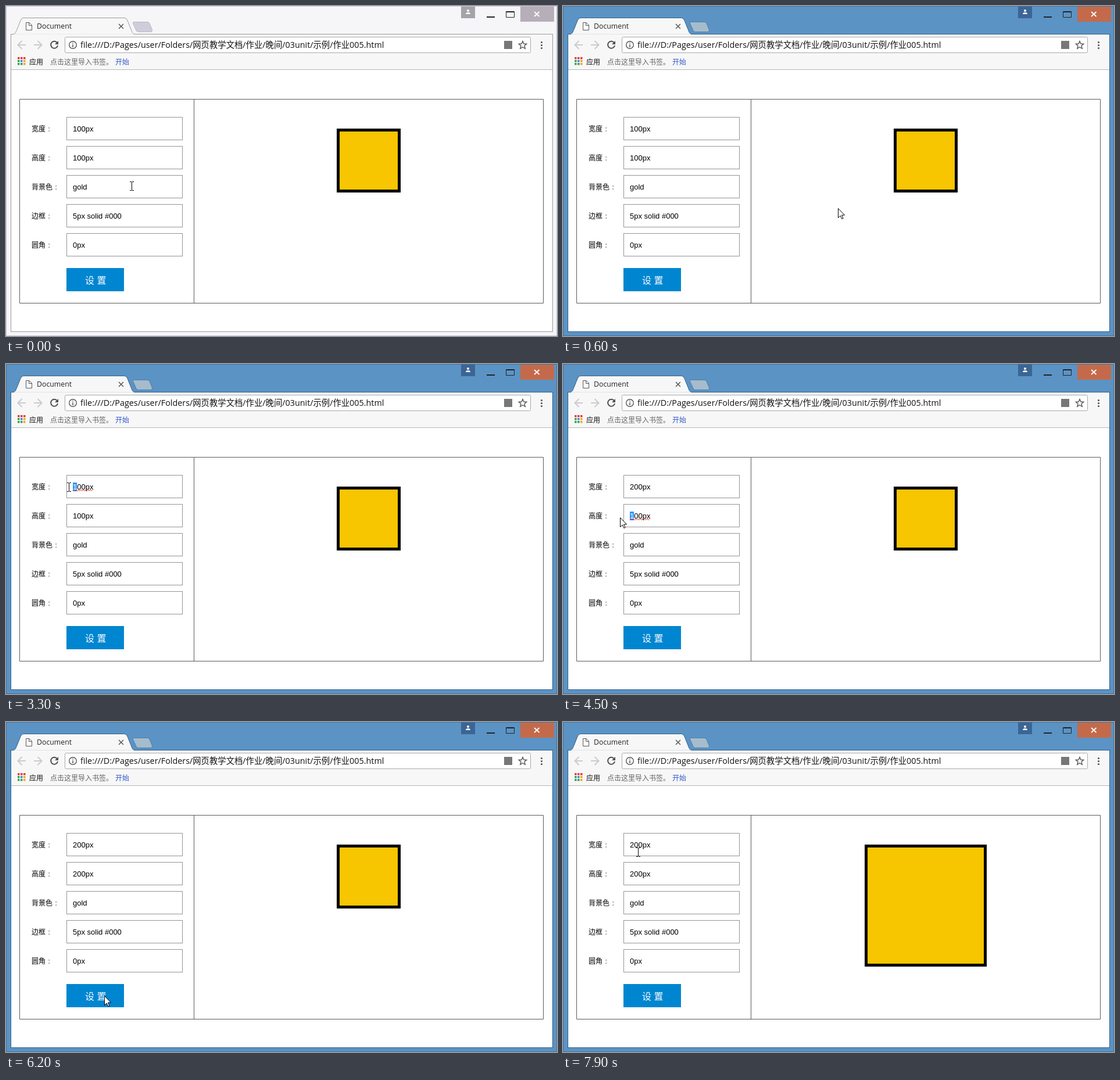
An HTML page that plays this animation: 948 by 568 pixels, repeating every 8000 ms.

```html
<!DOCTYPE html>
<html lang="zh-CN">
<head>
<meta charset="utf-8">
<title>Document</title>
<style>
  html, body { margin: 0; width: 100%; height: 100%; overflow: hidden; }
  svg {
    display: block; width: 948px; height: 568px;
    --bar: #5b93c5; --edge: #4a7397; --line: #2f6089; --plus: #a5bccd;
    --user: #3b6594; --close: #c46a4b;
  }
  svg.idle {
    --bar: #f6f5f8; --edge: #cac7d9; --line: #9b9b9f; --plus: #cfccdc;
    --user: #a5a2a8; --close: #b6aeb8;
  }
  text { font-family: "Open Sans", "Noto Sans CJK SC", "Noto Sans CJK", sans-serif; white-space: pre; }
  .ui { font-size: 12px; }
  .field { font: 13px "Liberation Sans", Arial, sans-serif; }
  .line { fill: none; stroke: #5a5a5a; }
</style>
</head>
<body>
<svg id="stage" class="idle" viewBox="0 0 948 568">
  <!-- window frame -->
  <rect x=".5" y=".5" width="947" height="567" style="fill:var(--bar);stroke:var(--edge)"/>
  <rect x="8.5" y="48.5" width="932" height="512" fill="#fff" style="stroke:var(--line)"/>
  <path d="M9 49H940V109H9Z" fill="#f7f7f7"/>
  <path d="M9 109.5H940" stroke="#b5b5b5"/>
  <path d="M13 48.5C17 47 17 44 19 40L25 25Q27 20.5 30 20.5H204Q207 20.5 209 25L215 40C217 45 217 47 221 48.5" fill="#f7f7f7" style="stroke:var(--line)"/>
  <path d="M14 49H220" stroke="#f7f7f7" stroke-width="1.4"/>
  <path d="M220 27.5H243Q246 27.5 247 30L251.5 41Q252 44.5 249 44.5H227Q225 44.5 224 42L218.5 30Q218 27.5 220 27.5Z" style="fill:var(--plus);stroke:var(--line)" stroke-opacity=".55"/>

  <!-- window buttons -->
  <path d="M783 1H807V21H783Z" style="fill:var(--user)"/>
  <circle cx="795" cy="8" r="2.1" fill="#fff"/>
  <path d="M791 14Q791 11 795 11T799 14Z" fill="#fff"/>
  <path d="M827 18H841V20H827Z" fill="#222"/>
  <path d="M860.5 9.5H874.5V19.5H860.5ZM860 10.5H875" class="line" style="stroke:#222"/>
  <path d="M885 1H943V27H885Z" style="fill:var(--close)"/>
  <path d="M909 10L917.5 18M917.5 10L909 18" stroke="#fff" stroke-width="1.8"/>

  <!-- tab -->
  <path d="M34.5 28.5H40L44.5 33V41.5H34.5ZM39.5 28.5V33.5H44.5" fill="#fff" stroke="#555"/>
  <text x="53" y="39" font-size="12.3" fill="#222">Document</text>
  <path d="M194 31L202 39M202 31L194 39" stroke="#555" stroke-width="1.5"/>

  <!-- toolbar -->
  <g fill="none" stroke-width="2">
    <path d="M34 67H21M27.5 60L20.5 67L27.5 74M48 67H61M54.5 60L61.5 67L54.5 74" stroke="#cacad0"/>
    <path d="M88.2 63.5A6 6 0 1 0 89 68" stroke="#505050"/>
    <path d="M90 60V66H84Z" fill="#505050" stroke="none"/>
  </g>
  <rect x="101.5" y="53.5" width="801" height="27" rx="2" fill="#fff" stroke="#a9a9a9"/>
  <circle cx="115" cy="67" r="6.3" fill="none" stroke="#555" stroke-width="1.4"/>
  <path d="M115 66V71M115 63V64.6" stroke="#555" stroke-width="1.5"/>
  <text x="128" y="72" font-size="14.35" fill="#111">file:///D:/Pages/user/Folders/网页教学文档/作业/晚间/03unit/示例/作业005.html</text>
  <rect x="857" y="60" width="14" height="14" fill="#777"/>
  <path d="M889 60.5L890.9 65L895.7 65.4L892 68.5L893.2 73.3L889 70.7L884.8 73.3L886 68.5L882.3 65.4L887.1 65Z" fill="none" stroke="#555" stroke-width="1.4"/>
  <g fill="#555"><circle cx="921.5" cy="62.5" r="1.6"/><circle cx="921.5" cy="67.5" r="1.6"/><circle cx="921.5" cy="72.5" r="1.6"/></g>

  <!-- bookmarks -->
  <g id="apps"></g>
  <g class="ui">
    <text x="40" y="100.5" fill="#111">应用</text>
    <text x="76" y="100.5" fill="#666">点击这里导入书签。</text>
    <text x="188" y="100.5" fill="#3158c8">开始</text>
  </g>

  <!-- page -->
  <path class="line" d="M23.5 160.5H924.5V511.5H23.5ZM323.5 160V512"/>
  <g id="form"></g>
  <path d="M104 451H203V491H104Z" fill="#0086d1"/>
  <text y="478" font-size="16" fill="#fff"><tspan x="136">设</tspan><tspan x="156.5">置</tspan></text>
  <rect id="box" y="213.5" fill="#f7c600" stroke="#000" stroke-width="5"/>

  <rect id="caret" x="122" width="1" height="15"/>
  <g id="pointer">
    <path id="arrow" d="M.5 .5V16.5L4.2 13L6.8 18.5L9 17.5L6.5 12H11.5Z" fill="#fff" stroke="#000"/>
    <path id="beam" d="M-3 -7.5H0M1 -7.5H4M.5 -7V7M-3 7.5H0M1 7.5H4" stroke="#000"/>
  </g>
</svg>
<script>
const LOOP = 8000, STEP = 100;
const $ = id => document.getElementById(id);

function add(parent, tag, attrs, text = '') {
  const el = document.createElementNS('http://www.w3.org/2000/svg', tag);
  for (const key in attrs) el.setAttribute(key, attrs[key]);
  el.textContent = text;
  parent.append(el);
  return el;
}

const [red, green, blue, amber] = ['#e23b32', '#2fa34f', '#4285f4', '#f2a81d'];
[red, red, red, green, blue, amber, green, green, amber].forEach((fill, i) =>
  add($('apps'), 'rect', { x: 20 + i % 3 * 5, y: 88 + Math.floor(i / 3) * 5, width: 3.5, height: 3.5, fill }));

const rows = [['宽度', '100px'], ['高度', '100px'], ['背景色', 'gold'], ['边框', '5px solid #000'], ['圆角', '0px']]
  .map(([label, value], i) => {
    const y = 191 + i * 50, form = $('form');
    add(form, 'text', { x: 44, y: y + 25, class: 'ui' }, label);
    add(form, 'text', { x: 50 + label.length * 12, y: y + 25, class: 'ui', 'text-anchor': 'middle', fill: '#246' }, ':');
    add(form, 'rect', { x: 104.5, y: y + .5, width: 199, height: 39, fill: '#fff', stroke: '#949494' });
    const mark = add(form, 'g', {});
    add(mark, 'rect', { x: 115, y: y + 13, width: 7, height: 15, fill: '#3297fd' });
    const text = add(form, 'text', { x: 115, y: y + 25, class: 'field' });
    const first = add(text, 'tspan', {}, value[0]);
    add(text, 'tspan', {}, value.slice(1));
    let wave = `M115 ${y + 27.5}`;
    for (let x = 117; x <= 150; x += 2) wave += `L${x} ${y + (x % 4 === 1 ? 25.5 : 27.5)}`;
    add(mark, 'path', { d: wave, fill: 'none', stroke: '#e22' });
    return { y, mark, first };
  });

// time, x, y of the pointer's hot spot
const path = [
  [0, 216, 310], [500, 473, 348], [700, 473, 348], [800, 483, 338], [900, 470, 300],
  [1200, 290, 159], [1400, 150, 178], [1600, 111, 286], [1700, 113, 300], [1900, 119, 286],
  [2200, 136, 243], [2300, 134, 230], [2500, 122, 216], [2600, 98, 213], [2800, 98, 213],
  [2900, 98, 214], [3100, 107, 212], [3200, 107, 212], [3300, 108, 212], [3500, 108, 213],
  [4000, 124, 253], [4100, 124, 253], [4300, 121, 259], [4500, 98, 264], [4900, 98, 264],
  [5300, 130, 300], [5700, 169, 358], [6200, 169, 471], [7100, 169, 471],
  [7500, 128, 335], [7900, 129, 224], [8000, 129, 224]
];

// per edited row: selected, typed, left
const edits = [[2600, 3400, 4200], [4400, 4900, 6200]];

function pointerAt(t) {
  const i = path.findIndex(p => p[0] > t);
  const [t0, x0, y0] = path[i - 1], [t1, x1, y1] = path[i];
  const k = (t - t0) / (t1 - t0);
  return [Math.round(x0 + (x1 - x0) * k), Math.round(y0 + (y1 - y0) * k)];
}

const show = (el, on) => el.style.display = on ? '' : 'none';

function draw(t) {
  $('stage').classList.toggle('idle', t < 500);

  let caretOn = false;
  rows.forEach(({ y, mark, first }, i) => {
    const [select, type, leave] = edits[i] || [LOOP, LOOP, LOOP];
    const marked = t >= select && t < type;
    show(mark, marked);
    first.style.fill = marked ? '#fff' : '';
    if (!edits[i]) return;
    first.textContent = t < type ? '1' : '2';
    if (t >= type && t < leave && (t - type) % 1000 < 500) {
      caretOn = true;
      $('caret').setAttribute('y', y + 13);
    }
  });
  show($('caret'), caretOn);

  const size = t < 6600 ? 105 : 205;
  $('box').setAttribute('x', 624 - size / 2);
  $('box').setAttribute('width', size);
  $('box').setAttribute('height', size);

  const [x, y] = pointerAt(t);
  const overField = x >= 104 && x < 304 && rows.some(r => y >= r.y && y < r.y + 40);
  $('pointer').setAttribute('transform', `translate(${x} ${y})`);
  show($('arrow'), !overField);
  show($('beam'), overField);
}

const start = performance.now();
function tick() {
  const t = (performance.now() - start) % LOOP;
  draw(Math.floor(t / STEP) * STEP);
  requestAnimationFrame(tick);
}
tick();
</script>
</body>
</html>
```
